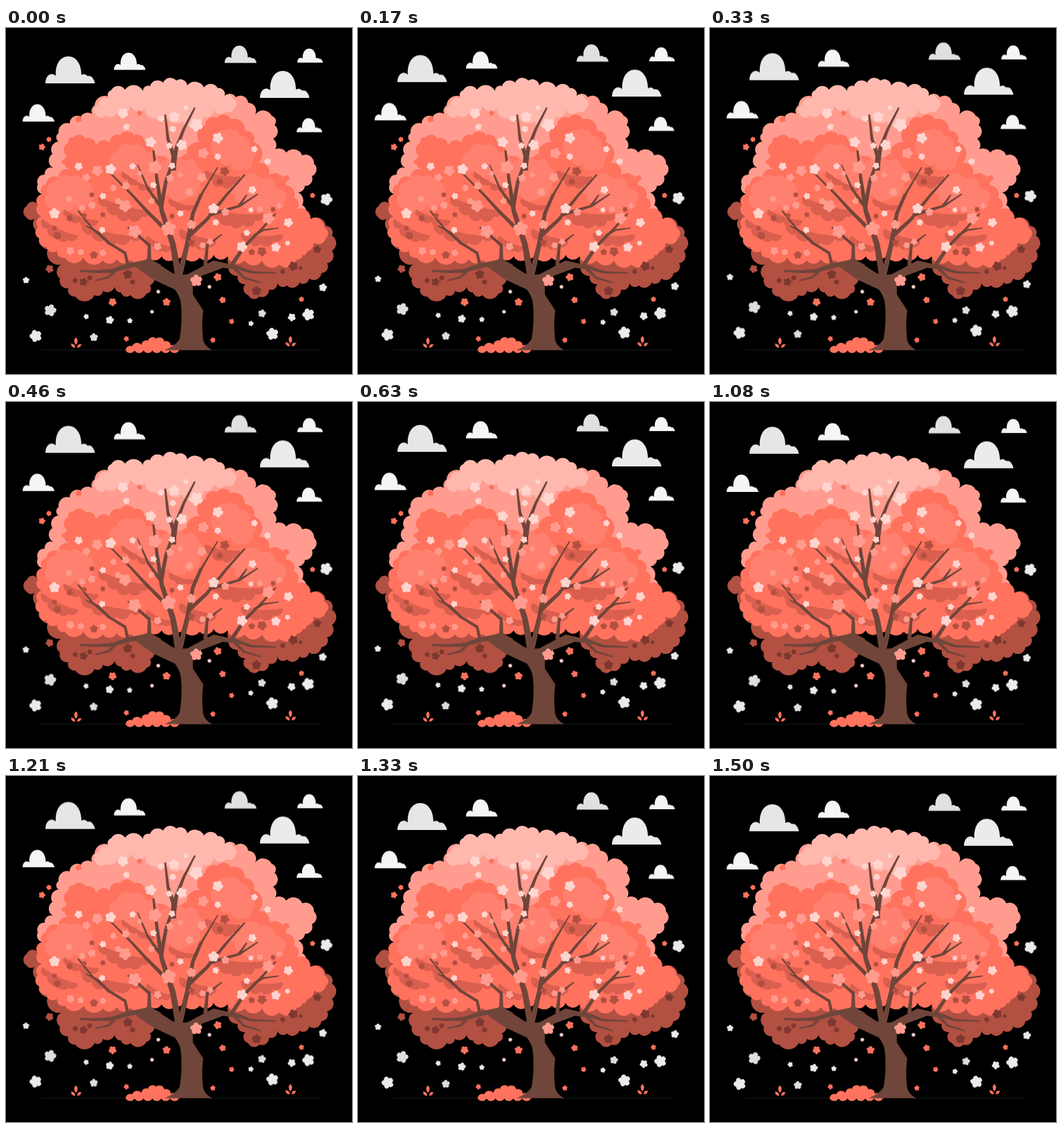
An HTML page that plays this animation: 500x500 px, repeating every 1540 ms.

```html
<!DOCTYPE html>
<html lang="en">
<head>
<meta charset="utf-8">
<title>Blossom tree</title>
<style>
  html, body { margin: 0; width: 100%; height: 100%; overflow: hidden; background: #000; }
  svg { display: block; width: 100vw; height: 100vh; }
</style>
</head>
<body>
<svg viewBox="0 0 500 500">
  <defs>
    <path id="cloud" d="M0 39C0 31 4 25 10 25.500Q13 26 15 28C14 12 21 0 33 0C45 0 52 12 52 27Q57 24 61 28.500Q66 27 69 32.500Q71 35 71.500 39Z"/>
    <g id="flower"></g>
  </defs>
  <g id="tree"></g>
  <g id="air"></g>
</svg>
<script>
const tree = document.getElementById('tree');
const air = document.getElementById('air');

const CORAL = '#ff725e', SOFT = '#ff806e', PINK = '#ff9c8f', PALE = '#ffb8ae';
const BLUSH = '#ffd5cf', SHADE = '#d95f4f', DEEP = '#b25042', WINE = '#7d382f', BARK = '#70453a';

function add(parent, tag, attrs) {
  const el = document.createElementNS('http://www.w3.org/2000/svg', tag);
  for (const k in attrs) el.setAttribute(k, attrs[k]);
  return parent.appendChild(el);
}

const pairs = s => s.trim().split(/\s+/).map(p => p.split(',').map(Number));
const shape = (fill, d) => add(tree, 'path', { fill, d });

// Outline with round bumps along each edge, clockwise
function foliage(fill, text, step = 21) {
  const pts = pairs(text);
  let d = `M${pts[0]}`;
  pts.forEach(([x, y], i) => {
    const [u, v] = pts[(i + 1) % pts.length];
    const len = Math.hypot(u - x, v - y);
    const n = Math.max(1, Math.round(len / step));
    const r = len / n * 0.58;
    for (let k = 1; k <= n; k++) {
      d += `A${r} ${r} 0 0 1 ${x + (u - x) * k / n} ${y + (v - y) * k / n}`;
    }
  });
  shape(fill, d + 'Z');
}

// Branch narrowing from width a to width b
function branch(a, b, text) {
  const pts = pairs(text), left = [], right = [];
  pts.forEach(([x, y], i) => {
    const p = pts[Math.max(0, i - 1)], q = pts[Math.min(pts.length - 1, i + 1)];
    const len = Math.hypot(q[0] - p[0], q[1] - p[1]);
    const w = (a + (b - a) * i / (pts.length - 1)) / 2;
    const nx = -(q[1] - p[1]) / len * w, ny = (q[0] - p[0]) / len * w;
    left.push([x + nx, y + ny]);
    right.unshift([x - nx, y - ny]);
  });
  shape(BARK, 'M' + left.concat(right).join('L') + 'Z');
}

function flowers(parent, fill, text) {
  for (const [x, y, r] of pairs(text)) {
    const turn = (x * 7 + y * 3) % 72;
    add(parent, 'use', { href: '#flower', fill, transform: `translate(${x} ${y}) rotate(${turn}) scale(${r})` });
  }
}

const flower = document.getElementById('flower');
add(flower, 'circle', { r: 0.5 });
for (let i = 0; i < 5; i++) {
  const a = i * Math.PI * 0.4;
  add(flower, 'circle', { cx: 0.57 * Math.sin(a), cy: -0.57 * Math.cos(a), r: 0.4 });
}

// Crown, back to front
foliage(DEEP, `30,257 45,254 60,300 90,332 200,330 210,350 208,372 203,384 180,386 166,382
  158,370 140,380 128,386 100,388 90,376 78,362 80,342 60,320 42,274 30,274`);
foliage(DEEP, `440,276 462,286 471,300 471,322 464,340 456,354 438,362 424,368 406,372 392,368
  380,378 366,388 350,386 346,370 335,358 322,342 330,325 420,300`);
foliage(PINK, `54,240 46,226 56,212 68,202 67,182 76,164 76,152 92,138 108,128 128,128 128,112
  150,100 300,98 332,100 350,108 360,125 384,127 388,140 386,160 384,180 405,180 428,184
  445,196 442,214 432,228 416,236 428,256 430,272 300,300 100,300`);
foliage(PALE, `129,124 134,110 149,102 152,90 172,89 198,91 208,84 227,79 246,76 262,83 286,86
  306,87 316,98 328,102 331,114 318,120 300,118 285,128 270,140 255,134 232,128 215,130
  202,116 180,112 160,122 145,126`);
foliage(CORAL, `52,240 58,226 76,216 92,205 88,185 90,166 98,158 115,160 130,170 150,166 165,155
  185,155 200,165 212,188 240,200 262,188 280,165 288,140 305,130 325,132 345,148 358,165
  365,195 380,212 405,228 416,245 420,262 440,276 460,288 462,304 445,310 428,322 420,335
  395,342 370,336 345,336 320,330 300,328 280,332 255,328 245,332 225,330 205,330 180,335
  160,334 140,336 112,332 85,332 74,322 58,316 48,304 46,288 52,272 46,256`);
foliage(SOFT, '60,240 72,222 92,216 112,222 125,238 118,252 98,256 82,264 64,260');
foliage(SOFT, '150,196 160,180 182,170 202,180 222,196 244,196 262,190 276,200 280,225 262,245 235,240 215,232 190,215 168,208');
foliage(SOFT, '302,160 318,148 338,156 352,172 356,192 342,205 325,196 308,190');
foliage(SOFT, '322,226 345,215 368,218 390,232 404,250 390,262 365,258 340,254');

// Shadows below the clumps
function shadow(fill, text) {
  const [a, b, ...rest] = pairs(text);
  const low = [b, ...rest];
  let d = `M${a}`, [x, y] = a;
  for (const [u, v] of low) {
    const r = Math.hypot(u - x, v - y) * 0.56;
    d += `A${r} ${r} 0 0 0 ${u} ${v}`;
    [x, y] = [u, v];
  }
  const mx = (a[0] + x) / 2, my = (a[1] + y) / 2 + 7;
  shape(fill, `${d}Q${mx} ${my} ${a}Z`);
}
shadow(SHADE, '168,207 176,219 190,226 202,234 216,232');
shadow(SHADE, '84,262 92,274 106,280 120,284 134,278');
shadow(SHADE, '134,244 146,258 160,270 178,276 196,272 208,264');
shadow(SHADE, '110,284 124,298 142,306 160,310 180,304 196,302');
shadow(SHADE, '52,276 60,290 74,302 90,306 104,300');
shadow(SHADE, '288,206 298,220 312,228 328,226 338,214');
shadow(SHADE, '298,262 308,276 324,284 342,284 360,278 372,268');
shadow(SHADE, '252,290 260,306 274,316 290,316 304,306');
shadow(SHADE, '340,296 352,308 368,312 386,308 400,298');
shadow(SHADE, '204,300 212,314 226,322 240,316');
shadow(SHADE, '236,246 244,258 258,262 272,256');

// Ground
add(tree, 'path', { d: 'M50 465.300H455', stroke: '#20282b', 'stroke-width': 0.7 });
foliage(CORAL, '173,466 182,460 196,458 205,452 217,449 229,453 238,459 250,466', 14);
for (const [x, y] of [[101, 452], [411, 450]]) {
  shape(CORAL, `M${x} ${y - 5}q5 5 0 11q-5 -6 0 -11M${x - 7} ${y + 4}q6 0 6 6q-6 0 -6 -6M${x + 8} ${y + 5}q-6 -1 -6 5q5 0 6 -5`);
}

// Trunk and branches
shape(BARK, `M229 465.500Q246 459 251 449Q255 425 253 400Q252 388 244 378L214 364L188 346L208 333
  L240 354L249 357L262 356L300 336L322 341L310 348L283 358L270 371L270 385L285 408
  Q282 430 285 451Q287 460 298 465.500Z`);
branch(9, 3, '222,346 206,338 180,343 152,351 130,352 107,351');
branch(5, 2, '160,348 149,360 129,365');
branch(9, 2, '290,350 312,343 334,346 355,353 390,354');
branch(5, 2, '328,345 344,361 368,368');
branch(10, 3, '250,362 241,312 225,264 218,218 213,177');
branch(8, 4, '250,362 262,312 270,268 282,240');
branch(5, 1.5, '270,268 284,238 306,201');
branch(6, 4, '224,260 231,222 243,187');
branch(8, 2.5, '242,206 242,184 234,160 230,125');
branch(7, 2.5, '242,200 246,174 257,146 273,115');
branch(5, 1.5, '222,256 205,232 190,197');
branch(6, 2, '232,293 203,264 181,240 150,209');
branch(6, 2.5, '265,300 290,277 318,242 345,212');
branch(5, 2, '294,270 338,257 364,240');
branch(4, 2, '336,258 348,241');
branch(6, 2.5, '207,340 207,314 190,299 176,288');
branch(5, 2, '176,342 172,325 149,311 126,291 104,264');
branch(4, 2, '150,312 134,296 116,286');
branch(6, 2, '288,343 291,314 312,298');
branch(6, 2, '326,343 344,316 368,292 390,268');
branch(4, 1.5, '358,300 372,292 394,289');

// Blossom
flowers(tree, DEEP, `74,300,6 70,289,4 92,275,5 127,328,6 63,348,6 124,241,4 316,207,7 309,222,5
  370,323,7 355,324,5 113,271,4 240,272,4 140,270,4 386,262,4 268,310,5`);
flowers(tree, WINE, `176,356,7 183,367,4 112,367,6 121,361,4 100,365,4 362,380,7 450,320,6
  415,344,7 400,352,4 426,347,3`);
flowers(tree, CORAL, `193,123,4 130,181,5 84,193,4 158,168,4 105,132,5 62,161,4 52,172,5 443,242,4
  405,217,5 390,213,4 259,187,5 430,324,5 306,360,6 313,393,5 232,396,6 154,396,6 174,449,4
  326,424,4 299,451,4 427,392,4 404,255,4`);
flowers(tree, PINK, `215,201,10 193,210,4 132,206,8 116,216,6 173,228,6 172,257,9 235,290,11 186,294,10
  275,365,9 219,316,6 108,324,5 93,322,6 91,247,5 124,256,6 285,181,8 283,216,7 265,237,6
  268,284,7 317,266,6 379,275,9 284,314,5 295,309,5 140,325,5 210,250,5 237,217,6 110,260,5
  155,231,5 162,250,5 252,212,4 367,262,5 395,257,4`);
flowers(tree, BLUSH, `169,123,8 174,143,5 224,131,5 243,128,8 260,115,4 275,140,10 241,146,5 254,169,8
  236,170,5 240,199,5 209,165,8 306,159,8 306,186,5 359,175,5 378,193,5 151,204,8 105,200,6
  183,200,5 213,227,5 140,243,5 70,268,8 139,292,5 252,268,5 300,261,8 303,281,5 356,234,6
  354,263,4 348,296,5 341,316,8 390,317,7 407,311,4 408,281,7 294,374,3 220,381,3 211,410,3`);

// Floating clouds and petals
for (const [x, base, w, fill] of [
  [57, 80, 71.5, '#e6e6e6'], [156, 60.5, 45.5, '#f5f5f5'], [316, 50.5, 46, '#e0e0e0'],
  [421, 50, 37, '#f5f5f5'], [367, 101, 71.5, '#ebebeb'], [24, 135.3, 46, '#f5f5f5'], [420, 150.5, 37, '#f5f5f5']
]) {
  const s = w / 71.5;
  add(air, 'use', { href: '#cloud', fill, transform: `translate(${x} ${base - 39 * s}) scale(${s})` });
}
const petals = add(air, 'g', {});
flowers(petals, '#ebebeb', `29,364.5,5 43,445,9 116,417,4 150,422,6 179,423,4 354,427,4 385,442,9
  413,418,6 437,414,9 458,375,6 463,247.5,9`);
flowers(petals, '#dedede', '64,408,9 127,447,6 370,412.5,6');

// Height over the loop: [ms, share of full drop]
const LOOP = 1540, RISE = 8.2;
const steps = [[0, 1], [165, .79], [330, .44], [480, .17], [630, .03], [755, 0], [880, .04], [980, .18],
  [1080, .36], [1205, .57], [1330, .76], [1420, .89], [1500, .98], [1540, 1]];
const sway = (el, dx, dy) => el.animate(
  steps.map(([t, v]) => ({ offset: t / LOOP, transform: `translate(${dx * (1 - v)}px, ${dy * (1 - v)}px)` })),
  { duration: LOOP, iterations: Infinity });
sway(air, 0, -RISE);
sway(petals, -0.4, 0);
</script>
</body>
</html>
```
